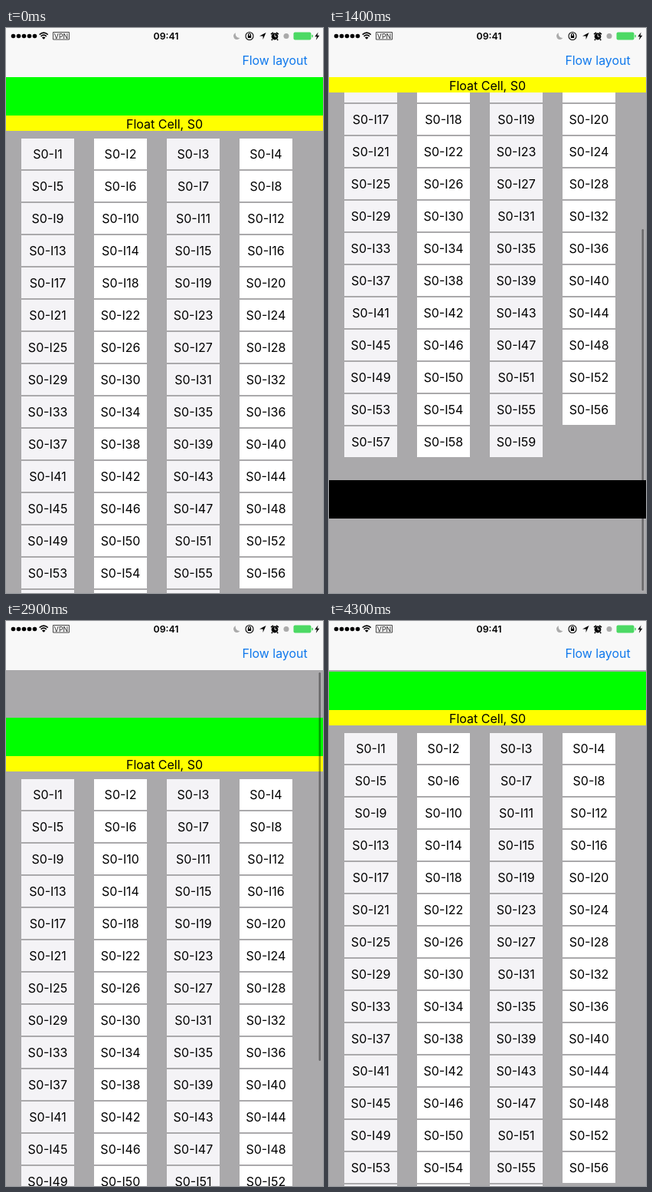
Recreate the animation shown at these times as an HTML page with a canvas. Size 414x736 px, loop 4400 ms.

```html
<!DOCTYPE html>
<html lang="en">
<head>
<meta charset="utf-8">
<title>Floating section header</title>
<style>
  html, body { margin: 0; width: 100%; height: 100%; overflow: hidden; background: #aaa9ab; }
  canvas { display: block; width: 414px; height: 736px; }
</style>
</head>
<body>
<canvas></canvas>
<script>
const W = 414, H = 736, NAV = 64, LOOP = 4400, TICK = 100;
const MAX_SCROLL = 116;
const FONT = 'Inter, "Open Sans", sans-serif';

// Two drags past the ends of the list; offsets per tick from DRAG_START on.
const DRAG_START = 4;
const DRAG = [7, 25, 52, 82, 108, 126, 141, 163, 184, 201, 213, 216, 207,
  191, 175, 160, 148, 132, 102, 64, 23, -18, -50, -72, -76];
const BOUNCE_START = 29;

const canvas = document.querySelector('canvas');
const ctx = canvas.getContext('2d');
const dpr = window.devicePixelRatio || 1;
canvas.width = W * dpr;
canvas.height = H * dpr;
ctx.scale(dpr, dpr);

function offsetAt(tick) {
  if (tick < DRAG_START) return 0;
  if (tick < BOUNCE_START) return DRAG[tick - DRAG_START];
  return Math.round(-62 * Math.exp(-(tick - BOUNCE_START) / 4) + 1e-9);
}

function rect(x, y, w, h, color) {
  ctx.fillStyle = color;
  ctx.fillRect(x, y, w, h);
}

function text(str, x, y, size = 16, color = '#000', weight = 400) {
  ctx.font = `${weight} ${size}px ${FONT}`;
  ctx.textAlign = 'center';
  ctx.fillStyle = color;
  ctx.fillText(str, x, y);
}

function circle(x, y, r, color) {
  ctx.fillStyle = color;
  ctx.beginPath();
  ctx.arc(x, y, r, 0, 7);
  ctx.fill();
}

function pill(x, y, w, h, r, color) {
  ctx.fillStyle = color;
  ctx.beginPath();
  ctx.roundRect(x, y, w, h, r);
  ctx.fill();
}

const fillPath = (d, color) => { ctx.fillStyle = color; ctx.fill(new Path2D(d)); };

function strokePath(d, width, color = '#000') {
  ctx.strokeStyle = color;
  ctx.lineWidth = width;
  ctx.stroke(new Path2D(d));
}

function drawCells(scroll) {
  for (let i = 0; i < 59; i++) {
    const col = i % 4;
    const x = 20 + col * 95;
    const y = 144 + Math.floor(i / 4) * 42 - scroll;
    if (y > H || y < NAV - 42) continue;
    rect(x, y, 69, 40, col % 2 ? '#fff' : '#f4f3f6');
    text(`S0-I${i + 1}`, x + 34.5, y + 26);
  }
}

function drawScrollbar(scroll, alpha) {
  if (alpha <= 0) return;
  const over = Math.max(0, -scroll, scroll - MAX_SCROLL);
  const inside = Math.min(Math.max(scroll, 0), MAX_SCROLL);
  const top = 67 + inside / MAX_SCROLL * 98 + (scroll > MAX_SCROLL ? over : 0);
  pill(408.5, top, 2.5, 568 - over, 1.25, `rgba(0,0,0,${0.38 * alpha})`);
}

function drawStatusBar() {
  for (let i = 0; i < 5; i++) circle(9.5 + i * 7, 10.5, 2.8, '#000');

  strokePath('M43.7 8.6Q49.2 3.6 54.7 8.6M45.6 10.8Q49.2 7.6 52.8 10.8', 1.6);
  fillPath('M46.9 12.4Q49.2 10.6 51.5 12.4L49.2 14.8Z', '#000');

  strokePath('M61.5 5.5h21v9.5h-21z', 0.9, '#333');
  text('VPN', 72, 13.5, 8.8, '#222');
  text('09:41', 209, 14.9, 12.3, '#000', 600);

  fillPath('M300 6.2A4.6 4.6 0 1 0 305.6 12.8A5 5 0 0 1 300 6.2Z', '#aaa');

  strokePath('M323 10.5a5 5 0 1 1-10 0a5 5 0 1 1 10 0M316.5 10V8.8a1.5 1.5 0 0 1 3 0V10', 1.1);
  rect(315.8, 9.8, 4.4, 3.2, '#000');

  fillPath('M339.5 6L335.6 15V10.4H331Z', '#000');

  circle(351, 11, 4.4, '#000');
  strokePath('M346 8.2L349 5.8M353 5.8L356 8.2M348 14.5L346.8 16M354 14.5L355.2 16', 1.5);
  strokePath('M351 8.2V11.2H353.4', 0.9, '#fff');

  circle(366, 10.5, 3.5, '#aaa');

  pill(375.5, 5.5, 23, 10, 2, '#4cd964');
  pill(399.3, 8.8, 1.6, 3.6, 0.8, '#4cd964');
  fillPath('M407.6 5.5L403.3 11.2H406L404.8 15.8L409.3 9.7H406.5Z', '#000');
}

function draw(tick) {
  const scroll = offsetAt(tick);
  rect(0, 0, W, H, '#aaa9ab');
  rect(0, NAV - scroll, W, 50, '#0f0');
  drawCells(scroll);
  rect(0, 802 - scroll, W, 50, '#000');

  const headerY = Math.max(NAV, 114 - scroll);
  rect(0, headerY, W, 20, '#ff0');
  text('Float Cell, S0', 207, headerY + 16.5);

  const fade = tick < DRAG_START ? 0 : Math.min(1, (42 - tick) / 3);
  drawScrollbar(scroll, fade);

  rect(0, 0, W, NAV, '#f8f8f8');
  text('Flow layout', 351, 48, 15.9, '#0f78ec');
  drawStatusBar();
}

const start = performance.now();
let shown = -1;

function frame(now) {
  const tick = Math.floor(Math.max(0, now - start) % LOOP / TICK);
  if (tick !== shown) draw(shown = tick);
  requestAnimationFrame(frame);
}

draw(0);
requestAnimationFrame(frame);
</script>
</body>
</html>
```
